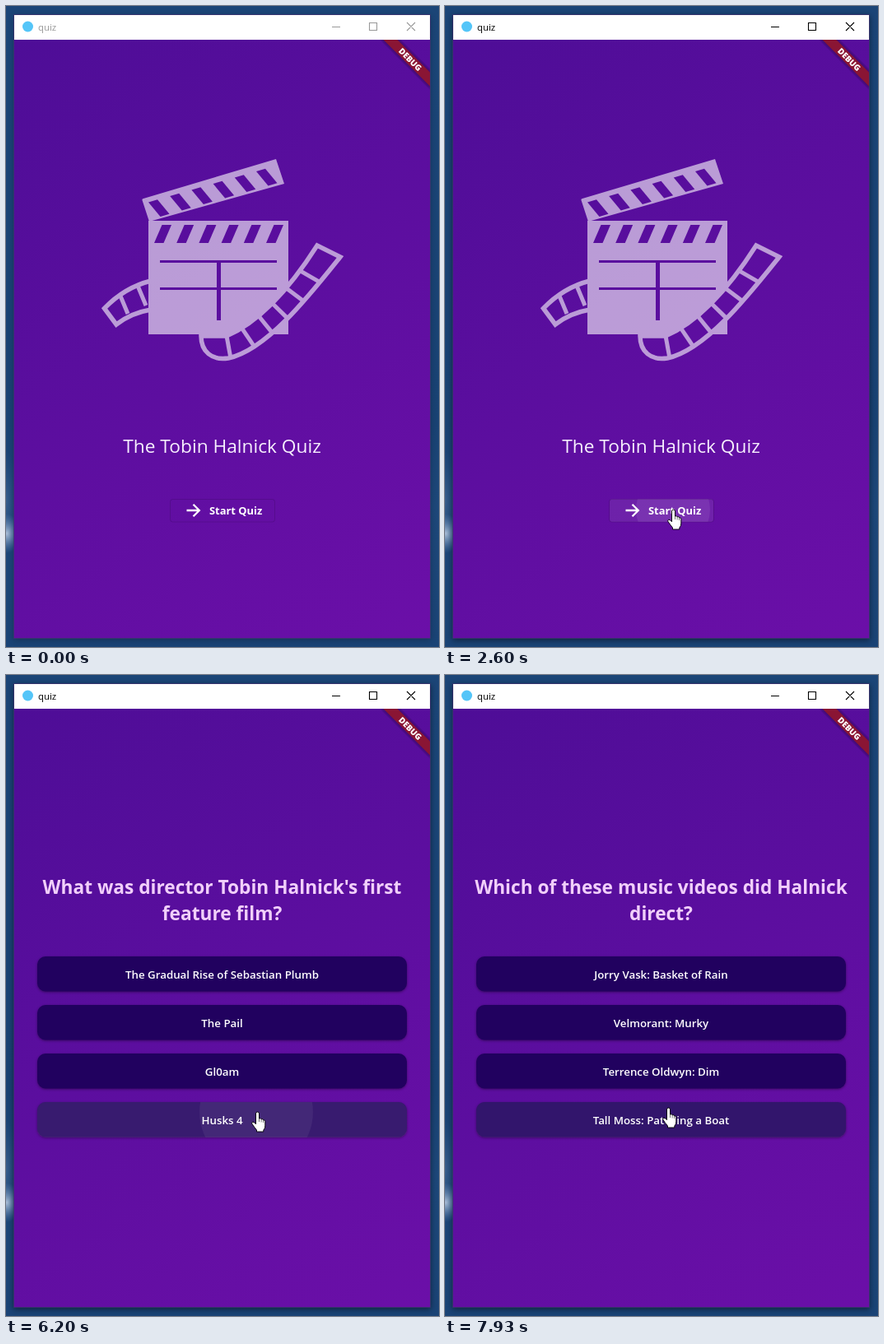
Animation of 526x779 px, one loop 8 s. Source, as an HTML page:

```html
<!DOCTYPE html>
<html lang="en">
<head>
<meta charset="utf-8">
<title>quiz</title>
<style>
  html, body { margin: 0; width: 100%; height: 100%; overflow: hidden; background: #1b4576; }
  svg { display: block; width: 100vw; height: 100vh; }
  text { font-family: "Open Sans", "Noto Sans", sans-serif; }
  .mid { text-anchor: middle; }
  .btn { font-size: 13.3px; font-weight: 600; fill: #fff; }
  .ask { font-size: 22.7px; font-weight: 700; fill: #f1cffa; }
  .answer { filter: drop-shadow(0 1px 1.5px rgba(0, 0, 0, .4)); }
</style>
</head>
<body>
<svg viewBox="0 0 526 779">
  <defs>
    <linearGradient id="purple" gradientUnits="userSpaceOnUse" x1="10" y1="41" x2="515" y2="768">
      <stop stop-color="#4e0d97"/><stop offset="1" stop-color="#6b0fa8"/>
    </linearGradient>
    <linearGradient id="desk" x2="0" y2="1">
      <stop stop-color="#1b4577"/><stop offset=".65" stop-color="#194273"/>
      <stop offset=".78" stop-color="#1d4779"/><stop offset="1" stop-color="#1a4375"/>
    </linearGradient>
    <radialGradient id="glow">
      <stop stop-color="#c3d3e8" stop-opacity=".85"/><stop offset="1" stop-color="#6d92c0" stop-opacity="0"/>
    </radialGradient>
    <filter id="soft" x="-20%" y="-20%" width="140%" height="140%"><feGaussianBlur stdDeviation="3.5"/></filter>
    <clipPath id="client"><rect x="10" y="41" width="505" height="727"/></clipPath>
    <clipPath id="lastAnswer"><rect x="38" y="519" width="449" height="43" rx="10"/></clipPath>
    <clipPath id="startArea"><rect x="200" y="599" width="126" height="28" rx="3"/></clipPath>
    <mask id="clapper" maskUnits="userSpaceOnUse" x="100" y="170" width="320" height="275">
      <g id="art"></g>
    </mask>
  </defs>

  <rect width="526" height="779" fill="url(#desk)"/>
  <ellipse cx="1" cy="641" rx="17" ry="24" fill="url(#glow)"/>
  <ellipse cx="0" cy="600" rx="14" ry="60" fill="url(#glow)" opacity=".2"/>
  <rect id="shade" x="9" y="12" width="507" height="759" filter="url(#soft)"/>
  <rect x="9.5" y="10.5" width="506" height="758" fill="url(#purple)" stroke="#3a3f63" stroke-opacity=".6"/>

  <rect x="10" y="11" width="505" height="30" fill="#fff"/>
  <circle cx="26.5" cy="25" r="6.5" fill="#54c5f8"/>
  <text id="caption" x="39" y="30" font-size="11.4">quiz</text>
  <path id="controls" d="M396 25.5h10M441.5 20.5h9v9h-9zM487 20l10 10M497 20l-10 10" fill="none" stroke-width="1.1"/>

  <g id="home">
    <rect x="100" y="170" width="320" height="275" fill="#fff" opacity=".588" mask="url(#clapper)"/>
    <text class="mid" x="262.5" y="543" font-size="22.7" font-weight="500" fill="#f7f0fe">The Tobin Halnick Quiz</text>
    <rect id="startHover" x="200" y="599" width="126" height="28" rx="3" fill="#fff"/>
    <circle id="startSplash" cx="277" cy="612" r="45" fill="#fff" opacity=".08" clip-path="url(#startArea)"/>
    <rect x="199.5" y="599.5" width="127" height="27.5" rx="3" fill="none" stroke="#000" stroke-opacity=".13"/>
    <path d="M219.5 613H234M227.5 605.7l7.3 7.3-7.3 7.3" fill="none" stroke="#fff" stroke-width="2.3"/>
    <text class="btn" x="247" y="618" style="font-size:12.9px;font-weight:700">Start Quiz</text>
  </g>

  <g id="quiz">
    <text class="ask mid" x="262.5" y="266"></text>
    <text class="ask mid" x="262.5" y="298"></text>
    <g id="answers"></g>
    <g clip-path="url(#lastAnswer)" fill="#fff">
      <rect id="hover" x="38" y="519" width="449" height="43"/>
      <circle id="splash" cx="304" cy="531"/>
    </g>
    <g id="labels"></g>
  </g>

  <g clip-path="url(#client)">
    <g transform="translate(515 41) rotate(45)">
      <rect x="-44" y="28" width="88" height="12" opacity=".5" filter="url(#soft)"/>
      <rect x="-44" y="28" width="88" height="12" fill="#8a1534"/>
      <text class="mid" y="37.6" font-size="10" font-weight="800" fill="#fff">DEBUG</text>
    </g>
  </g>

  <g id="cursor" fill="#fff" stroke="#000" stroke-linejoin="round">
    <path id="arrow" d="M.5 .5V16.5L4 13.2 6.5 19 8.8 18 6.4 12.3H11.5Z"/>
    <g id="hand" stroke-width=".9">
      <path d="M-1.5 2a2 2 0 0 1 4 0V8q2-.8 2.6.8 2-.6 2.5 1 2-.3 2.2 1.7V17q0 3-2 5V24H-.5V22Q-3 19-6 14.6q-1-2 .8-2.4 1.7 0 3.7 2.6z"/>
      <path d="M2.5 8v4M5.1 9v3.5M7.6 10v3" opacity=".6"/>
    </g>
  </g>
</svg>

<script>
const LOOP = 8000, STEP = 1000 / 15;
const $ = id => document.getElementById(id);
const show = (el, on) => el.setAttribute('display', on ? 'inline' : 'none');

function add(parent, tag, attrs) {
  const el = document.createElementNS('http://www.w3.org/2000/svg', tag);
  for (const k in attrs) el.setAttribute(k, attrs[k]);
  return parent.appendChild(el);
}

// Clapperboard and film strip, drawn as a mask: white keeps, black cuts.
function drawArt() {
  const art = $('art');
  const fill = (d, color) => add(art, 'path', { d, fill: color });
  const line = (d, width, color = '#fff') =>
    add(art, 'path', { d, fill: 'none', stroke: color, 'stroke-width': width });

  line('M176 334Q144 342 119.5 367.5L134 387Q152 373 176 369', 5.5);
  line('M138 350L148 374M160 340L170 364', 5);

  fill('M165.5 236Q165 234.5 167 234L328 186 338 216 174 262Z', '#fff');
  fill('M173 261H343V399H173Z', '#fff');
  for (let i = 0; i < 6; i++) {
    fill(`M${173 + i * 26.2} ${238.5 - i * 7.5}l11-3.3 14.5 17.5-11 3.3z`, '#000');
    fill(`M${180 + i * 27.2} 288h11.5l9.5-22h-11.5z`, '#000');
  }
  line('M187 310.5H329M187 343.5H329', 3.2, '#000');
  line('M258.5 310V382', 5, '#000');

  const inner = [[378, 291], [350, 335], [312, 382], [268, 401]];
  const outer = [[406, 305], [370, 350], [317, 418], [270, 428]];
  const strip = `M${inner[0]}C${inner.slice(1).join(' ')}H237C237 420 250 431 270 428C${outer.slice(0, 3).reverse().join(' ')}Z`;
  fill(strip, '#000');
  line(strip, 5.5);
  const at = (p, t) => [0, 1].map(k => {
    const u = 1 - t;
    return u * u * u * p[0][k] + 3 * u * u * t * p[1][k] + 3 * u * t * t * p[2][k] + t * t * t * p[3][k];
  });
  // The inner end runs ahead, so that bars stay square to the curve.
  for (const t of [.21, .36, .5, .63, .78, .98])
    line(`M${at(inner, Math.min(1, t * 1.1))}L${at(outer, t)}`, 5);
}

const questions = [
  { ask: ["What was director Tobin Halnick's first", 'feature film?'],
    options: ['The Gradual Rise of Sebastian Plumb', 'The Pail', 'Gl0am', 'Husks 4'] },
  { ask: ['Which of these music videos did Halnick', 'direct?'],
    options: ['Jorry Vask: Basket of Rain', 'Velmorant: Murky', 'Terrence Oldwyn: Dim', 'Tall Moss: Patching a Boat'] }
];

drawArt();
const asks = document.querySelectorAll('.ask');
const labels = questions[0].options.map((_, i) => {
  const y = 342 + i * 59;
  add($('answers'), 'rect', { class: 'answer', x: 38, y, width: 449, height: 42.5, rx: 10, fill: '#21015f' });
  return add($('labels'), 'text', { class: 'btn mid', x: 262.5, y: y + 27 });
});

// Pointer path: step, x, y
const path = [
  [7, 46, 752], [9, 150, 695], [10, 208, 680], [12, 296, 690], [14, 296, 690],
  [17, 400, 590], [20, 463, 420], [21, 445, 362], [22, 418, 360], [23, 395, 372],
  [25, 390, 470], [27, 397, 567], [29, 350, 618], [31, 312, 626], [35, 277, 612],
  [39, 277, 612], [40, 280, 615], [41, 335, 648], [42, 378, 662], [77, 378, 662],
  [78, 378, 661], [81, 352, 615], [84, 318, 550], [87, 304, 529], [89, 304, 529],
  [90, 305, 531], [93, 305, 531], [95, 307, 535], [97, 322, 600], [99, 331, 656],
  [101, 330, 626], [111, 330, 626], [113, 300, 570], [115, 275, 529], [118, 275, 529],
  [119, 271, 526]
];

function pointer(n) {
  const i = path.findIndex(p => p[0] >= n);
  if (i <= 0) return path[0].slice(1);
  const [a, b] = [path[i - 1], path[i]];
  const f = (n - a[0]) / (b[0] - a[0]);
  return [1, 2].map(k => Math.round(a[k] + (b[k] - a[k]) * f));
}

const inside = ([x, y], l, t, r, b) => x >= l && x <= r && y >= t && y <= b ? 1 : 0;
const overStart = n => n < 40 ? inside(pointer(n), 200, 599, 326, 627) : 0;
const overLast = n => n >= 40 ? inside(pointer(n), 38, 519, 487, 562) : 0;
const fade = (over, n) => .08 * (.6 * over(n) + .4 * over(n - 1));

function draw(t) {
  const n = Math.min(119, Math.floor((t + 3.5) / STEP));
  const active = n >= 39, onHome = n < 40;
  const ink = active ? '#000' : '#999';
  $('shade').setAttribute('opacity', active ? .45 : .22);
  $('caption').setAttribute('fill', ink);
  $('controls').setAttribute('stroke', ink);

  show($('home'), onHome);
  show($('quiz'), !onHome);
  $('startHover').setAttribute('opacity', fade(overStart, n));
  show($('startSplash'), n === 39);

  const q = questions[n < 95 ? 0 : 1];
  q.ask.forEach((s, i) => asks[i].textContent = s);
  q.options.forEach((s, i) => labels[i].textContent = s);

  const press = n >= 93 ? Math.max(0, Math.min(1, (100 - n) / 5)) : 0;
  $('hover').setAttribute('opacity', fade(overLast, n) + .02 * press);
  $('splash').setAttribute('r', 69 + Math.max(0, n - 93) * 52);
  $('splash').setAttribute('opacity', .055 * press);

  const hand = overStart(n) || overLast(n);
  show($('cursor'), n >= 7);
  $('cursor').setAttribute('transform', `translate(${pointer(n)})`);
  show($('hand'), hand);
  show($('arrow'), !hand);
}

const start = performance.now();
function tick() {
  draw((performance.now() - start) % LOOP);
  requestAnimationFrame(tick);
}
tick();
</script>
</body>
</html>
```
